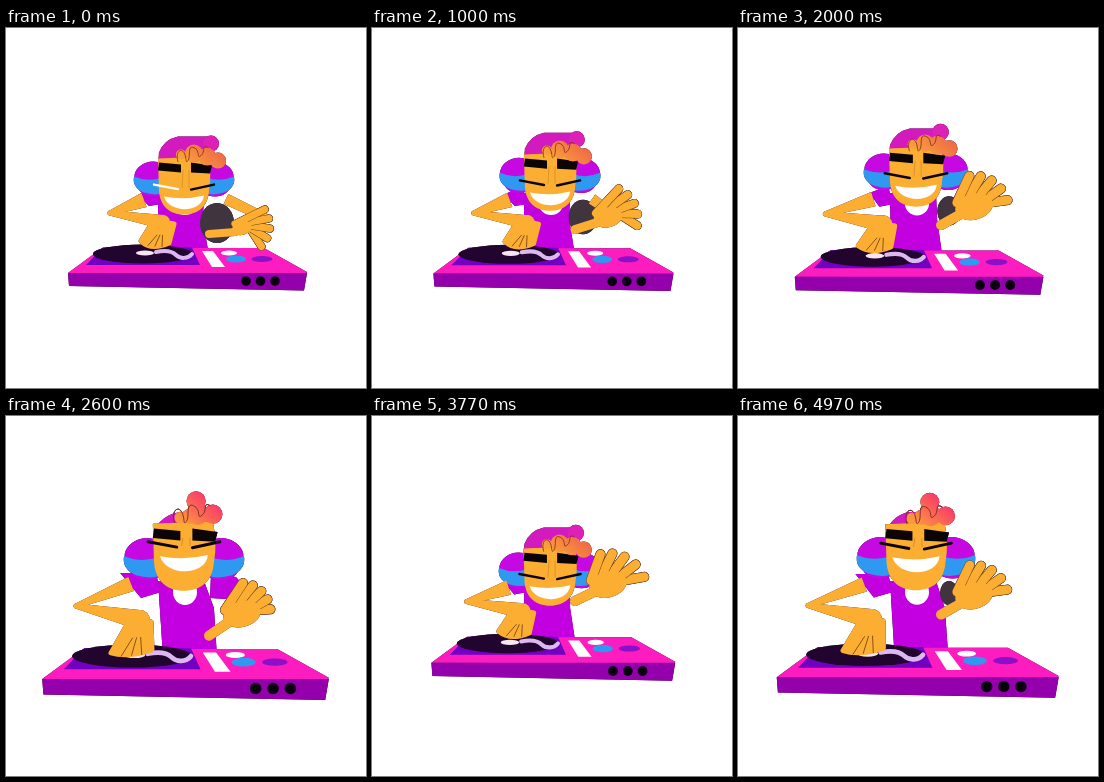
Animation, 360 px wide and 360 px high, one loop 5 s. Source, as an HTML page with a canvas:

```html
<!DOCTYPE html>
<html lang="en">
<head>
<meta charset="utf-8">
<title>DJ at the deck</title>
<style>
  html, body { margin: 0; width: 100%; height: 100%; overflow: hidden; background: #fff; }
  canvas { display: block; width: 100vw; height: 100vh; filter: drop-shadow(0 0 .5px #2a0828); }
</style>
</head>
<body>
<canvas id="stage" width="360" height="360"></canvas>
<script>
const c = document.getElementById('stage').getContext('2d');
const SKIN = '#fcae33', LINE = '#7a4816', SHIRT = '#c200e0', HAIR = '#d21abf';
const PUFF = '#c608e2', BLUE = '#2f98f0', INK = '#0b0508';
const STEP = 40, BAR = 12;

// Height of the right hand: drawing number, y
const HAND_Y = [[0, 198], [3, 166], [4, 178], [5, 196], [9, 163], [11, 170], [12, 198]];

const mix = (a, b, t) => a + (b - a) * t;
const wave = i => Math.cos(i / BAR * Math.PI * 2);

function along(keys, i) {
  const n = keys.findIndex(k => k[0] > i);
  const [a, from] = keys[n - 1], [b, to] = keys[n];
  return mix(from, to, (i - a) / (b - a));
}

function poly(color, ...p) {
  c.beginPath();
  for (let i = 0; i < p.length; i += 2) c.lineTo(p[i], p[i + 1]);
  c.closePath();
  c.fillStyle = color;
  c.fill();
}

function oval(color, x, y, rx, ry = rx, turn = 0) {
  c.beginPath();
  c.ellipse(x, y, rx, ry, turn, 0, Math.PI * 2);
  c.fillStyle = color;
  c.fill();
}

function shape(color, d) {
  c.fillStyle = color;
  c.fill(new Path2D(d));
}

function stroke(color, width, d) {
  c.strokeStyle = color;
  c.lineWidth = width;
  c.lineCap = c.lineJoin = 'round';
  c.stroke(new Path2D(d));
}

function taper(x, y, w, x2, y2, w2) {
  const a = Math.atan2(y2 - y, x2 - x), sx = -Math.sin(a) / 2, sy = Math.cos(a) / 2;
  poly(SKIN, x + sx * w, y + sy * w, x2 + sx * w2, y2 + sy * w2,
    x2 - sx * w2, y2 - sy * w2, x - sx * w, y - sy * w);
  oval(SKIN, x2, y2, w2 / 2);
}

function drawDeck(s) {
  c.save();
  c.translate(181.5 - 10 * (s - 1), 245 + 90 * (s - 1));
  c.scale(s, s);
  c.translate(-181.5, -245);
  poly('#fc1cc0', 62, 245, 96, 220, 258, 220, 301, 244, 300, 246);
  poly('#9300ac', 62, 245, 301, 245, 298, 262.5, 63, 258);
  poly('#7200c0', 80, 237, 97, 219.5, 186, 219.5, 194, 237);
  oval('#22052f', 137, 226, 50, 9.5);
  oval('#f6e6f4', 139, 225, 9, 2.6);
  stroke('#dcb8f0', 4, 'M150 224C160 222 166 223 170 227S182 231 186 226');
  poly('#fff', 196, 223, 207, 223, 219, 239, 206, 239);
  oval('#fff', 223, 225, 8, 2.5);
  oval(BLUE, 230, 231, 10, 3.6);
  oval('#8c10c8', 256, 231, 10.5, 3);
  for (let n = 0; n < 3; n++) oval('#0a0010', 240 + n * 14.5, 253, 4.8);
  c.restore();
}

function drawTorso(s, u, i) {
  const base = 228 + 60 * (s - 1), right = mix(203, 211, u);
  poly(SHIRT, 152, 165, 198, 165, mix(197, 208, u), 192, right, base, mix(152, 157, u), base);
  poly(SHIRT, mix(132, 114, u * u), mix(167, 157, u), 150, 158, 155, 176, mix(143, 135, u), mix(178, 182, u));
  if (u > .95) poly(SHIRT, 205, 158, 230, 161, 236, 168, 220, 183, 204, 182);
  if (i < 5) {
    const t = Math.min(1, i / 3);
    oval('#40343e', 211, mix(195, 177, t), mix(17, 9, t), mix(20, 12, t));
  }
  oval('#fff', 179, 176, 12, mix(11, 13, u));
}

function drawFace(i, u, d) {
  const shut = i === BAR - 1, brow = shut ? '#fff' : INK;
  poly(brow, -25, -52, -3, -50, -3, -42, -26, -44);
  poly(brow, 7, -52, 28, -49, 26, -41, 7, -42);
  if (!shut && i % 6 === 3) oval('#fff', 19, -45, 4.5, 2.5, -.3);
  stroke(shut || i === 0 ? '#fff' : INK, 2.4, `M-30 ${-30 + d}L-6 ${-25.5 + d}`);
  stroke(INK, 2.4, `M7 ${-25 + d}L30 ${-30 + d}`);
  stroke('#c07a20', .5, `M-1 -44L-2 ${-27 + d}M5 -44L5 ${-27 + d}`);
  shape(shut ? '#fbe0e4' : '#fff',
    `M-20 ${-18 + d}Q0 ${-14 + d} 20 ${-19 + d}C18 ${-1 + d} -15 ${-1 + d} -20 ${-18 + d}Z`);
}

function drawQuiff(u) {
  const hot = u > .8, g = c.createLinearGradient(0, -52, 20, -76);
  g.addColorStop(0, '#fba238');
  g.addColorStop(1, hot ? '#fa4068' : '#ee6a48');
  oval(hot ? g : '#dc20b8', mix(27, 10, u), mix(-71, -75, u), 8);
  oval(g, mix(34, 24, u), mix(-54, -64, u), 8);
  oval(g, mix(23, 11, u), mix(-58, -64, u), 9);
  oval(g, mix(10, 4, u), mix(-61, -62, u), mix(9, 6, u));
  oval(g, -3, mix(-60, -61, u), 5);
  const x = mix(-6, -8, u), y = mix(-53, -57, u);
  stroke('#7a3020', .8, `M${x} ${y}c-3 -10 3 -14 6 -9s1 12 4 8 -1 -16 6 -13 2 12 7 8 0 -12 7 -8`);
}

function drawHead(s, u, i) {
  const d = -11 * u, ear = 9 * u, top = mix(-78, -65, u);
  c.save();
  c.translate(178, 182 + 7.8 * wave(i + 1.8));
  c.scale(s, s);
  for (const side of [-1, 1]) {
    c.save();
    c.scale(side, 1);
    c.translate(0, ear);
    oval(PUFF, 34, -41, 16, 11.5, .35);
    oval(PUFF, 31, -29, 15, 11);
    shape(BLUE, 'M22 -37Q36 -32 50 -38Q52 -27 40 -22Q30 -19 22 -21Z');
    c.restore();
  }
  shape(HAIR, `M-26 -48L-25 ${top + 16}Q-20 ${top + 3} -6 ${top}L${mix(27, 12, u)} ${top}L24 -48Z`);
  shape(SKIN, 'M-26 -56L24 -58Q28 -40 25 -24C24 -8 14 0 0 0S-24 -8 -25 -24Z');
  drawFace(i, u, d);
  drawQuiff(u);
  c.restore();
}

function drawLeftArm(u) {
  const out = 1 - (1 - u) ** 3;
  const ex = mix(104, 70, out), ey = 185 + 5 * u;
  const px = mix(157, 134, out), py = 200 + 10 * u;
  const ax = px - 22 - 7 * out, ay = py + 13 + 14 * u;
  const bx = px + 6 + 6 * u, by = py + 15 + 9 * u;
  taper(mix(138, 125, u), mix(172, 168, u), 15, ex, ey, 5);
  taper(ex, ey, 5, px, py - 6, mix(14, 20, out));

  const palm = `M${px - 9} ${py - 8}L${ax} ${ay}Q${(ax + bx) / 2 - 4} ${by + 8} ${bx} ${by}L${px + 11} ${py - 4}Z`;
  shape(SKIN, palm);
  stroke(SKIN, 5, palm);
  for (let n = 1; n < 4; n++) {
    const t = n / 4, x = mix(ax, bx, t), y = mix(ay, by, t) + 4;
    stroke(LINE, .9, `M${x} ${y}L${mix(x, px, .6)} ${mix(y, py, .6)}`);
  }
}

function drawRightArm(i) {
  const x = 235, y = along(HAND_Y, i);
  const press = (y - 163) / 35, grip = Math.max(0, 1 - i / 2);
  if (grip) {
    const ex = mix(214, 258, grip), ey = mix(176, 189, grip);
    taper(220, 171, 11, ex, ey, 9);
    taper(ex, ey, 9, x, y, 12);
  }
  const w = 9 - 2 * grip, gap = 8 - 5 * grip;
  for (let n = 4; n >= 0; n--) {
    const a = (-105 + 20 * press + (24 - 4 * press) * n + 50 * grip) * Math.PI / 180;
    const reach = 29 + .6 * n * n * (1 - press);
    const d = `M${x + (n - 2) * gap} ${y - 2}L${x + reach * Math.cos(a)} ${y + reach * Math.sin(a)}`;
    stroke(LINE, w + 1, d);
    stroke(SKIN, w, d);
  }
  stroke(SKIN, w + 1, `M${x - 6} ${y + 6}L${x - 32} ${y + 18 + 6 * press - 16 * grip}`);
  oval(SKIN, x + 1, y + 2, 19 - 9 * grip, 13 - 6 * grip, -.25);
}

function draw(ms) {
  const i = Math.floor(ms % 5000 / STEP) % BAR;
  const u = .5 - .5 * Math.sin(Math.PI / 2 * wave(i + .2)), s = 1 + .2 * u;
  c.clearRect(0, 0, 360, 360);
  drawTorso(s, u, i);
  drawHead(s, u, i);
  drawDeck(s);
  drawLeftArm(u);
  drawRightArm(i);
}

function tick() {
  draw(performance.now());
  requestAnimationFrame(tick);
}
tick();
</script>
</body>
</html>
```
